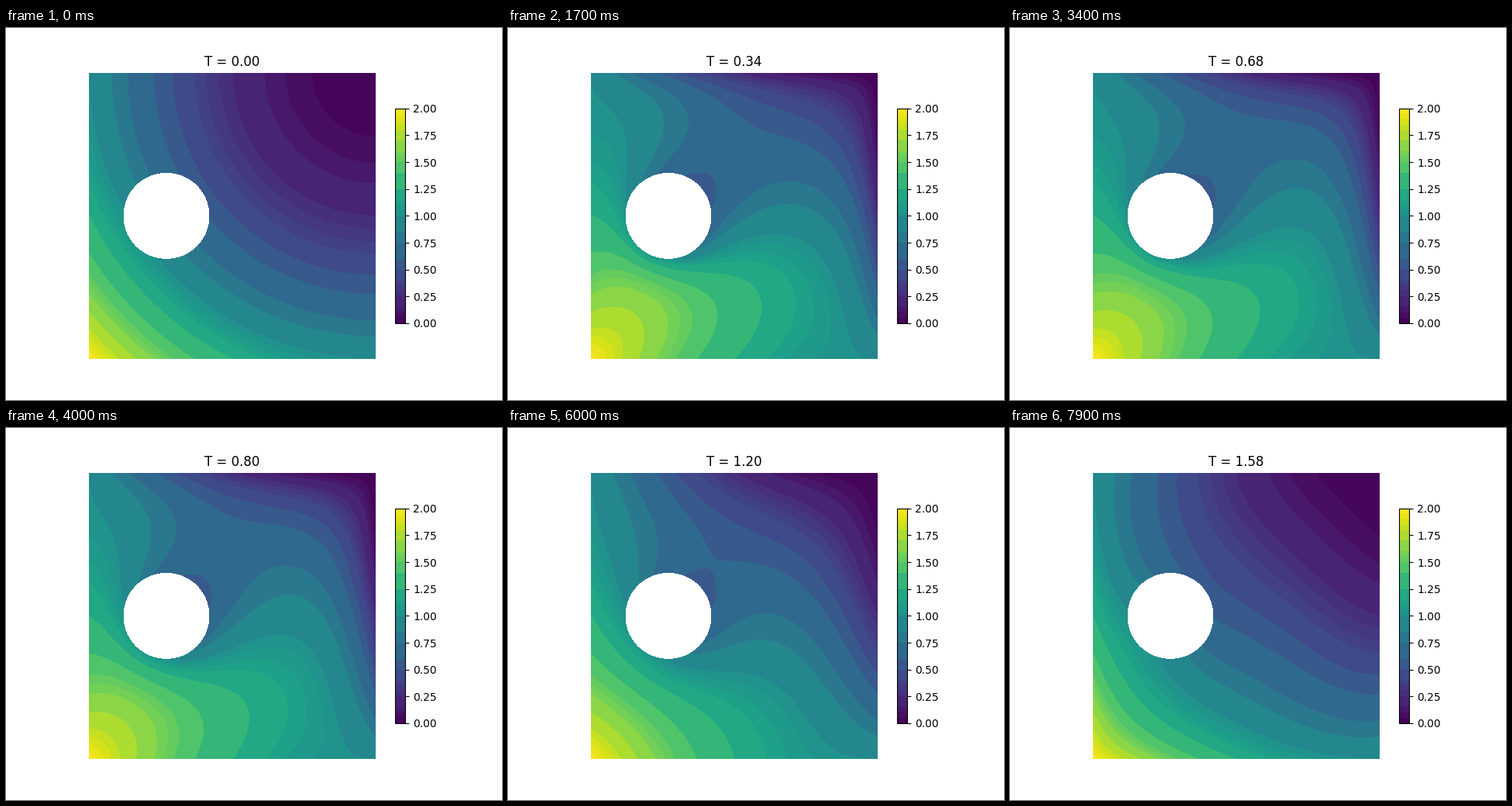
Animation, 640 px wide and 480 px high, one loop 8000 ms. Source, as a matplotlib script:

```python
import numpy as np
import matplotlib.pyplot as plt
from matplotlib.animation import FuncAnimation
from matplotlib.patches import Circle

# Heat carried by an oscillating diagonal wind around a hole,
# with fixed temperatures on the square's edge and on the hole.
N = 101
FRAMES = 80
STEP = 0.02
SUBSTEPS = 100
EPS = 0.1
OMEGA = 1.33
HOLE, RADIUS = (0.27, 0.5), 0.1487

axis = np.linspace(0, 1, N)
X, Y = np.meshgrid(axis, axis)
edge_temp = (1 - X) ** 2 + (1 - Y) ** 2
solid = np.hypot(X - HOLE[0], Y - HOLE[1]) <= RADIUS
fluid = (~solid[1:-1, 1:-1]).astype(float)


def solve():
    h = axis[1]
    dt = STEP / SUBSTEPS
    u = edge_temp.copy()
    fields = [u.copy()]
    t = 0.0
    for _ in range(FRAMES - 1):
        for _ in range(SUBSTEPS):
            wind = np.cos(OMEGA * (t + dt / 2))
            c = u[1:-1, 1:-1]
            w, e = u[1:-1, :-2], u[1:-1, 2:]
            s, n = u[:-2, 1:-1], u[2:, 1:-1]
            spread = EPS / h**2 * (w + e + s + n - 4 * c)
            drift = wind / (2 * h) * (e - w + n - s)
            u[1:-1, 1:-1] = c + dt * fluid * (spread - drift)
            t += dt
        fields.append(np.clip(u, 0, 2))
    return fields


def band_colors(levels):
    """One viridis colour per level; neighbouring levels share wider bands."""
    cuts = np.array([0, .05, .1, .15, .25, .3, .35, .4, .5, .6, .75, .85, 1,
                     1.05, 1.1, 1.15, 1.25, 1.4, 1.5, 1.55, 1.6, 1.7, 1.8,
                     1.85, 1.9, 1.95, 2])
    mids = (levels[:-1] + levels[1:]) / 2
    band = np.searchsorted(cuts, mids) - 1
    return plt.cm.viridis((cuts[band] + cuts[band + 1]) / 4)


fields = solve()
levels = np.linspace(0, 2, 41)
colors = band_colors(levels)

fig, ax = plt.subplots(figsize=(6.4, 4.8), dpi=100)
ax.set_aspect("equal")
ax.axis("off")


def draw_field(u):
    return ax.contourf(X, Y, u, levels=levels, colors=colors)


contours = draw_field(fields[0])
bar = fig.colorbar(contours, ax=ax, shrink=0.75, format="%.2f",
                   ticks=np.arange(0, 2.01, 0.25))
bar.minorticks_off()
ax.add_patch(Circle(HOLE, RADIUS, fc="white", ec="none", lw=0,
                    antialiased=False, zorder=3))
ax.set_xlim(0, 1)
ax.set_ylim(0, 1)
title = ax.set_title("T = 0.00")


def update(i):
    global contours
    contours.remove()
    contours = draw_field(fields[i])
    title.set_text(f"T = {i * STEP:.2f}")
    return [title]


anim = FuncAnimation(fig, update, frames=FRAMES, interval=100,
                     repeat=True, repeat_delay=0, blit=False)
plt.show()
```
